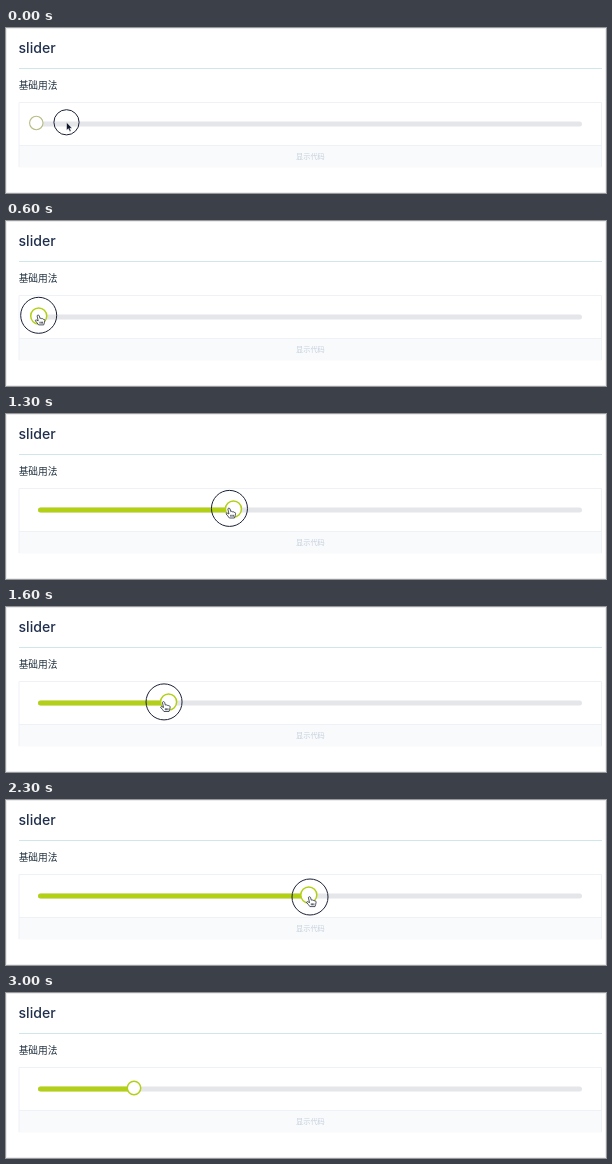
Recreate the animation shown at these times as an HTML page. Size 600x165 px, loop 3.1 s.

```html
<!DOCTYPE html>
<html lang="zh">
<head>
<meta charset="utf-8">
<title>slider</title>
<style>
  html, body { margin: 0; width: 100%; height: 100%; overflow: hidden; background: #fff; }
  svg { display: block; width: 600px; height: 165px; }
  .title { font: 500 14.1px Inter, sans-serif; fill: #1f2f4d; }
  .cjk { font-family: "Noto Sans CJK SC", "Noto Sans CJK", sans-serif; }
</style>
</head>
<body>
<svg viewBox="0 0 600 165">
  <rect x=".5" y=".5" width="599" height="164" fill="#fff" stroke="#ebebeb"/>
  <text class="title" x="12.5" y="24.5">slider</text>
  <path d="M13 40.5H596" stroke="#cfe7e8"/>
  <text class="cjk" x="12.7" y="60.8" font-size="9.7" font-weight="500" fill="#1f2f3d">基础用法</text>

  <rect x="13" y="118" width="583" height="21.5" fill="#f9fafc"/>
  <path d="M13 139V74.5H595.5V139M13 117.5H595.5" fill="none" stroke="#eef1f6"/>
  <text class="cjk" x="290" y="131.3" font-size="7.2" fill="#c5d0dc">显示代码</text>

  <rect x="32" y="93.5" width="544" height="5" rx="2.5" fill="#e5e6e9"/>
  <rect id="fill" x="32" y="93.5" height="5" rx="2.5" fill="#b4d016"/>
  <circle id="knob" cy="95" fill="#fff"/>
  <circle id="ring" fill="none" stroke="#1a2136"/>
  <g id="cursor">
    <path id="arrow" d="M0 0V8L1.9 6.4L3.2 9.2L4.6 8.6L3.4 5.9H5.7Z" fill="#10182c" stroke="#fff" stroke-width=".5"/>
    <path id="hand" d="M-1.6 .7C-1.6-.5 .3-.6 .6 .6L1.3 3.2C2 2.6 2.9 2.9 3.1 3.6C3.8 3.1 4.6 3.4 4.8 4.1C5.6 3.8 6.1 4.3 6.1 5.2C6.1 7 5.4 7.7 5 9.6H-.1C-.7 8.2-2.6 6.8-3.3 5.6C-3.6 4.6-2.4 4.3-1.7 5L-.5 5.6ZM1.3 6.4V8.3M2.6 6.4V8.3M3.9 6.4V8.3"
      fill="#fff" stroke="#222938" stroke-width=".8" stroke-linejoin="round"/>
  </g>
</svg>
<script>
const LOOP = 3100, TICK = 100, FADE = 100, LAG = 25;
const MIN_X = 30.3, RING = 18;

const home = { x: 60.5, y: 94.3 };
const moves = [
  { from: 200, to: 500, x: 32.7, y: 94.3 },
  { from: 600, to: 1150, x: 237, y: 94.3 },
  { from: 1150, to: 1750, x: 144.5, y: 95 },
  { from: 1800, to: 2100, x: 304, y: 97 },
  { from: 2400, to: 2700, x: 132, y: 94.5 },
  { from: 2800, to: 3000, x: 780, y: 216 }
];
const presses = [
  { down: -70, up: 150 },
  { down: 450, up: 1750 },
  { down: 2150, up: 2300 },
  { down: 2700, up: 2800 }
];
const clicks = [{ at: 2300, x: 302.8 }, { at: 2800, x: 128 }];

const clamp = v => Math.min(1, Math.max(0, v));
const ease = p => (1 - Math.cos(Math.PI * p)) / 2;

function pointer(t) {
  let { x, y } = home;
  for (const m of moves) {
    const p = ease(clamp((t - m.from) / (m.to - m.from)));
    x += (m.x - x) * p;
    y += (m.y - y) * p;
  }
  return { x, y };
}

// The knob trails the pointer while dragged and jumps on a track click.
function knobX(t) {
  const drag = presses[1];
  if (t < drag.down) return MIN_X;
  const click = clicks.filter(c => t >= c.at).pop();
  return click ? click.x : pointer(Math.min(t, drag.up + LAG) - LAG).x;
}

const ringRadius = t => RING * Math.max(...presses.map(({ down, up }) =>
  Math.min(clamp((t - down) / FADE), clamp(1 - (t - up) / FADE))));

function set(id, attrs) {
  const el = document.getElementById(id);
  for (const k in attrs) el.setAttribute(k, attrs[k]);
}
const show = on => ({ visibility: on ? 'visible' : 'hidden' });

function draw(t) {
  const { x, y } = pointer(t), k = knobX(t), r = ringRadius(t);
  const idle = t < 400;
  const hover = !idle && Math.abs(x - k) < 9;
  const arrow = t < 300 || t >= 2900;

  set('fill', { width: Math.max(0, k - 32) });
  set('knob', {
    cx: k,
    r: hover ? 8 : 6.7,
    stroke: idle ? '#b8bd85' : '#b4d016',
    'stroke-width': idle ? 1.1 : 1.5
  });
  set('ring', { cx: x, cy: y, r, ...show(r > 0) });
  set('cursor', { transform: `translate(${x} ${y})` });
  set('arrow', show(arrow));
  set('hand', show(!arrow));
}

const start = performance.now();
function frame() {
  const t = (performance.now() - start) % LOOP;
  draw(Math.floor(t / TICK) * TICK);
  requestAnimationFrame(frame);
}
frame();
</script>
</body>
</html>
```
